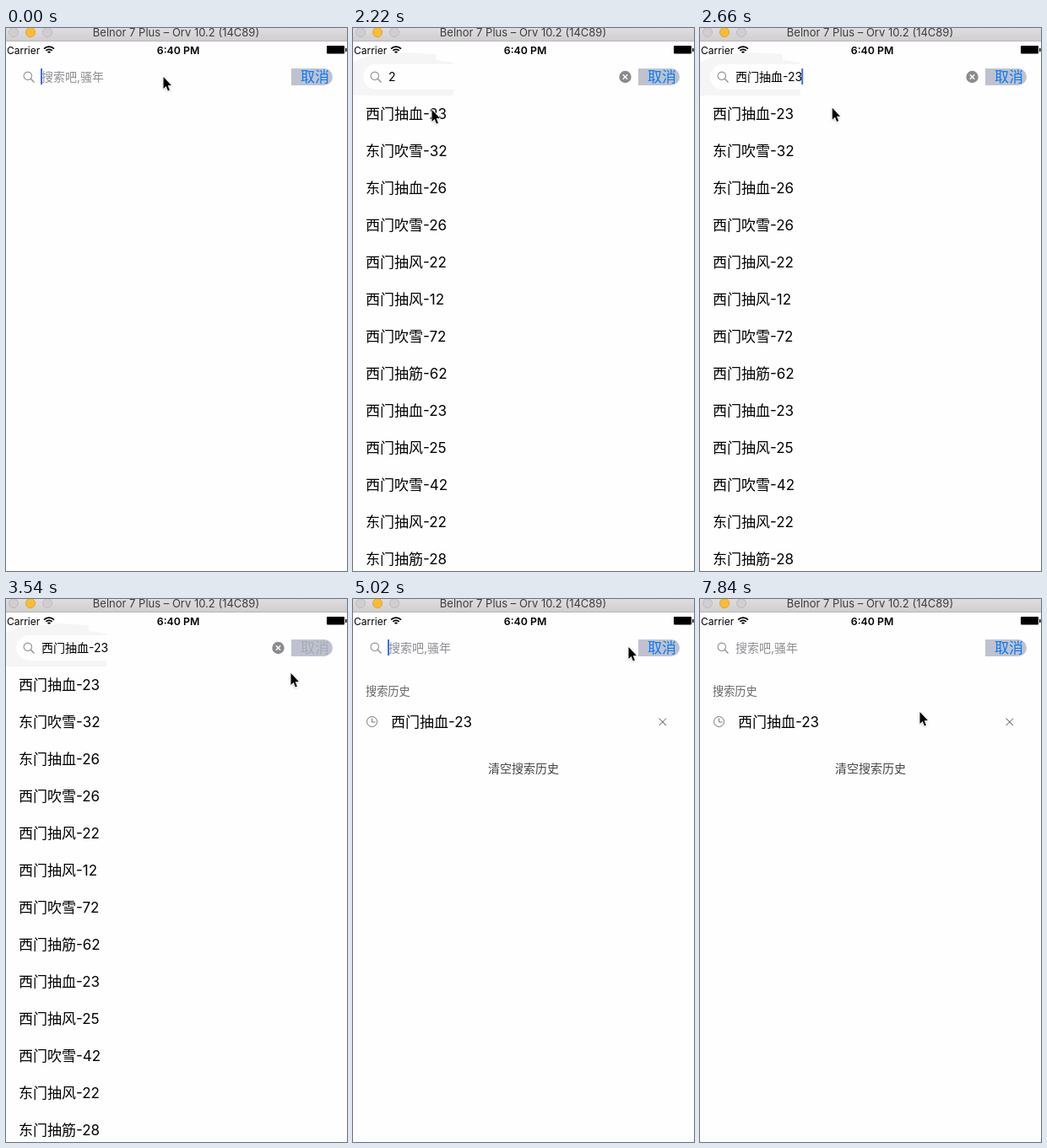
Write an HTML page with a canvas that moves like this. It is 404 px wide and 644 px high and loops after 7.99 s.

```html
<!DOCTYPE html>
<html lang="zh-CN">
<head>
<meta charset="utf-8">
<style>
html, body { margin: 0; width: 100%; height: 100%; overflow: hidden; background: #fefefe; }
canvas { display: block; width: 404px; height: 644px; }
</style>
</head>
<body>
<canvas></canvas>
<script>
const W = 404, H = 644, LOOP = 7990, STEPS = 54;
const FONT = 'Inter, "Noto Sans CJK SC", "Noto Sans CJK", sans-serif';
const canvas = document.querySelector('canvas');
const ctx = canvas.getContext('2d');
const dpr = window.devicePixelRatio || 1;
canvas.width = W * dpr;
canvas.height = H * dpr;

const PICK = '西门抽血-23';
const rows = [PICK, '东门吹雪-32', '东门抽血-26', '西门吹雪-26', '西门抽风-22', '西门抽风-12', '西门吹雪-72',
  '西门抽筋-62', PICK, '西门抽风-25', '西门吹雪-42', '东门抽风-22', '东门抽筋-28'];

// Event times, in steps of the loop
const TYPE = 11, CHOOSE = 16, PRESS = 24, CANCEL = 34;

// Pointer strokes: first step, last step, end point
const strokes = [[4, 7, 113, 66], [12, 15, 94, 97], [17, 20, 338, 88],
  [26, 28, 356, 80], [28, 31, 327, 57], [50, 53, 261, 134]];

const clamp = v => Math.min(1, Math.max(0, v));
const ease = k => k * k * (3 - 2 * k);

function pointerAt(step) {
  return strokes.reduce(([x, y], [from, to, endX, endY]) => {
    const k = ease(clamp((step - from) / (to - from)));
    return [x + (endX - x) * k, y + (endY - y) * k];
  }, [187, 58]);
}

const queryAt = step => step < TYPE || step >= CANCEL ? '' : step < CHOOSE ? '2' : PICK;

// The blink restarts whenever the field is set anew
function caretAlpha(step) {
  if (step >= PRESS && step < CANCEL) return 0;
  const origin = step >= CANCEL ? CANCEL : step >= CHOOSE ? CHOOSE : 1.9;
  const phase = Math.max(0, step - origin) / 6.8 % 1;
  return phase < .45 ? 1 : phase < .6 ? .5 : 0;
}

function text(s, x, y, size, color = '#000', align = 'left', weight = 400) {
  ctx.font = `${weight} ${size}px ${FONT}`;
  ctx.textAlign = align;
  ctx.fillStyle = color;
  ctx.fillText(s, x, y);
}
function rect(x, y, w, h, color, radii = 0) {
  ctx.beginPath();
  ctx.roundRect(x, y, w, h, radii);
  ctx.fillStyle = color;
  ctx.fill();
}
function poly(points, color) {
  ctx.beginPath();
  points.forEach(p => ctx.lineTo(...p));
  ctx.closePath();
  ctx.fillStyle = color;
  ctx.fill();
}
function stroke(color, width) {
  ctx.strokeStyle = color;
  ctx.lineWidth = width;
  ctx.stroke();
}
function circle(x, y, r, fill, edge, width = 1) {
  ctx.beginPath();
  ctx.arc(x, y, r, 0, 7);
  ctx.fillStyle = fill;
  if (fill) ctx.fill();
  if (edge) stroke(edge, width);
}
function line(color, width, ...points) {
  ctx.beginPath();
  points.forEach(p => ctx.lineTo(...p));
  stroke(color, width);
}
function cross(x, y, r, color, width) {
  line(color, width, [x - r, y - r], [x + r, y + r]);
  line(color, width, [x - r, y + r], [x + r, y - r]);
}

function titleBar() {
  const g = ctx.createLinearGradient(0, 0, 0, 15);
  g.addColorStop(0, '#dfdddf');
  g.addColorStop(1, '#d0ced0');
  rect(0, 0, W, 15, g);
  rect(0, 15, W, 1, '#b8b6b8');
  circle(9, 5, 5.5, '#d0ced0', '#bdbbbd');
  circle(29, 5, 5.5, '#fdbd2f', '#dfa032');
  circle(49, 5, 5.5, '#d0ced0', '#bdbbbd');
  text('Belnor 7 Plus – Orv 10.2 (14C89)', 201.5, 10, 13, '#3e3d3e', 'center');
}

function statusBar() {
  text('Carrier', 1, 31, 12);
  text('6:40 PM', 204, 31, 12.3, '#000', 'center', 600);
  for (const r of [8.4, 5.2, 2]) {
    ctx.beginPath();
    ctx.arc(51, 30.5, r, -Math.PI * .75, -Math.PI * .25);
    stroke('#000', 1.8);
  }
  rect(380, 21, 21, 9.5, '#000', 1);
  rect(402, 24, 1.5, 4, '#000');
}

function searchBar(query, pressed) {
  circle(25.8, 56.8, 4.7, null, '#8e8e93', 1.1);
  line('#8e8e93', 1.3, [29.3, 60.3], [33.5, 64.5]);
  text(query || '搜索吧,骚年', 42, 63, 14, query ? '#000' : '#8e8e93');
  if (query) {
    circle(322.5, 58, 7.2, '#8b8b8f');
    cross(322.5, 58, 2.7, '#fff', 1.4);
  }
  rect(338, 48, 49, 20, '#bfc2ce', [0, 10, 10, 0]);
  text('取消', 349, 64, 17, pressed ? '#a5a9ba' : '#007aff');
}

function caret(step) {
  // While text is replaced the caret trails one step behind
  const before = queryAt(step) && queryAt(step - 1);
  ctx.font = `14px ${FONT}`;
  const x = 41 + ctx.measureText(before).width;
  ctx.globalAlpha = caretAlpha(step);
  rect(x, 48, 2, 19, '#426bf2');
  ctx.globalAlpha = 1;
}

function results(step) {
  poly([[0, 40], [18, 33], [60, 29], [98, 31], [98, 38], [119, 41], [119, 80], [0, 80]], '#f5f5f5');
  rect(12, 43, 107, 30, '#fefefe', [15, 0, 0, 15]);
  if (step >= CHOOSE) {
    ctx.globalAlpha = clamp(1 - (step - CHOOSE) / 2);
    rect(0, 80, W, 44, '#d9d9d9');
    ctx.globalAlpha = 1;
  }
  rows.forEach((s, i) => text(s, 15, 108 + 44 * i, 17));
}

function history() {
  text('搜索历史', 15, 114, 13.2, '#666');
  circle(22.5, 145.5, 6, null, '#777');
  line('#777', 1, [22.5, 141.5], [22.5, 146], [26.5, 146]);
  text(PICK, 45, 152, 17);
  cross(366.8, 145.8, 4.2, '#555', 1);
  text('清空搜索历史', 202, 205.5, 14, '#444', 'center');
}

function arrow(x, y) {
  ctx.save();
  ctx.translate(x - .5, y);
  ctx.shadowColor = 'rgba(0,0,0,.4)';
  ctx.shadowBlur = 3 * dpr;
  ctx.shadowOffsetY = dpr;
  poly([[0, 0], [0, 14], [3.2, 11], [5.4, 16.4], [7.4, 15.4], [5.2, 10.2], [9.4, 10]], '#000');
  ctx.shadowColor = 'transparent';
  ctx.lineJoin = 'round';
  stroke('#fff', 1.6);
  ctx.fill();
  ctx.restore();
}

function draw(now) {
  const step = Math.floor(now % LOOP / LOOP * STEPS + .15) % STEPS;
  const query = queryAt(step);
  ctx.setTransform(dpr, 0, 0, dpr, 0, 0);
  rect(0, 0, W, H, '#fefefe');
  if (query) results(step);
  if (step >= CANCEL) history();
  titleBar();
  statusBar();
  searchBar(query, step >= PRESS && step < CANCEL);
  caret(step);
  arrow(...pointerAt(step));
}

const start = performance.now();
function tick() {
  draw(performance.now() - start);
  requestAnimationFrame(tick);
}
tick();
</script>
</body>
</html>
```
